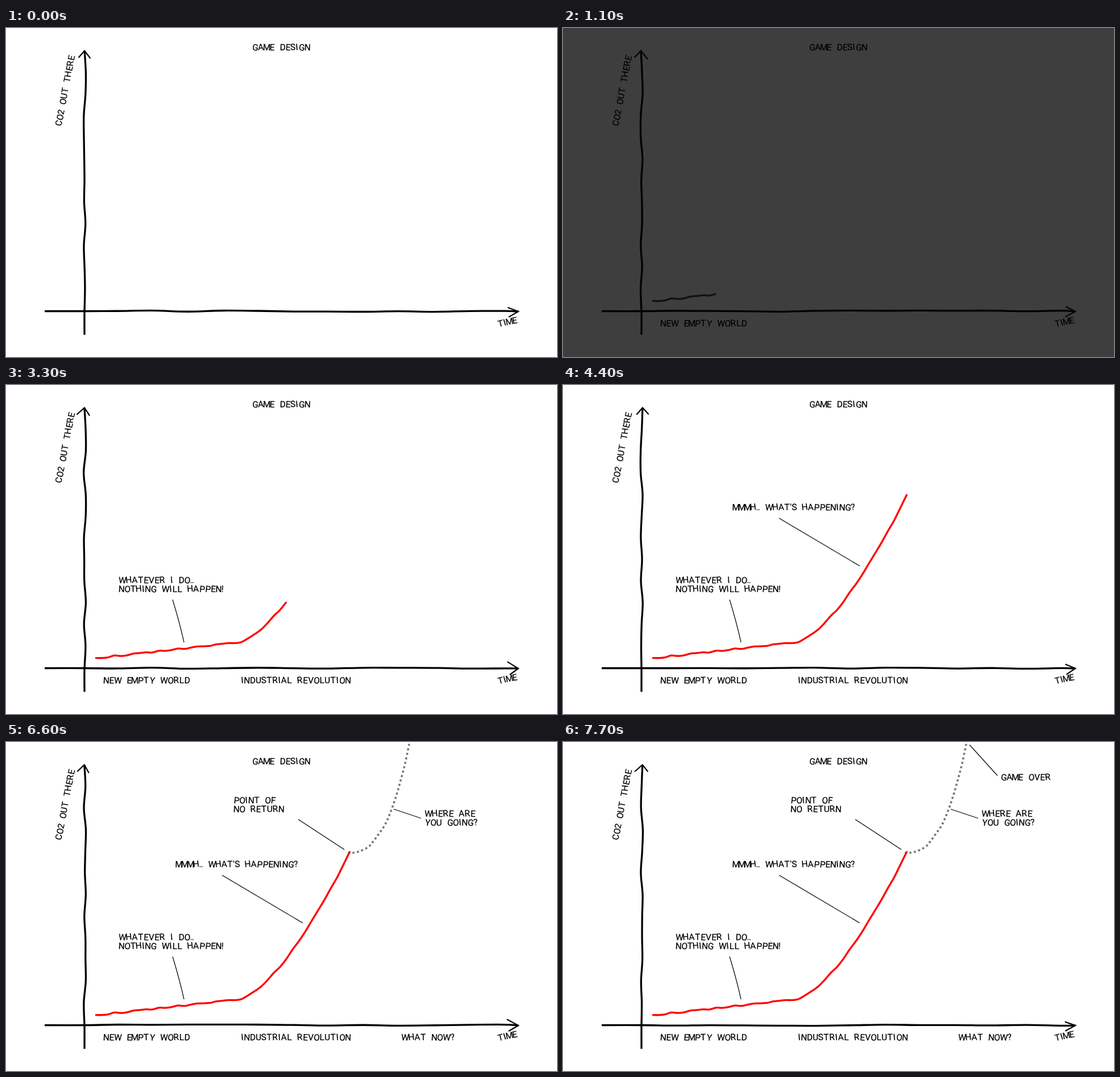
These frames come from a looping animation (969x578 px, 8000 ms). An HTML page:

```html
<!DOCTYPE html>
<html lang="en">
<head>
<meta charset="utf-8">
<title>Game design</title>
<style>
  html, body { margin: 0; width: 100%; height: 100%; overflow: hidden; background: #fff; }
  svg { display: block; width: 100%; height: 100%; }
  path { fill: none; stroke: #000; }
  text { font: 15.5px Roboto, "Open Sans", sans-serif; text-anchor: middle; stroke: #000; stroke-width: .2; stroke-linejoin: round; }
  .axis { stroke-width: 3.3; }
  .arrow { stroke-width: 2.2; }
  .pointer { stroke-width: 1.2; }
  .curve { stroke: #f00; stroke-width: 3.3; }
  .future { stroke: #777; stroke-width: 3.6; stroke-dasharray: 3.6 4.4; }
  .dark { background: #3e3e3e; }
  .dark .curve { stroke: #111; }
</style>
</head>
<body>
<svg id="stage" viewBox="0 0 969 578"></svg>
<script>
const LOOP = 8000, STEP = 1100, LINE_HEIGHT = 15.5;
const stage = document.getElementById('stage');

// from: first step in which the label shows; pointer: its thin line
const labels = [
  { from: 0, x: 433, y: 39, lines: ['GAME DESIGN'] },
  { from: 0, x: 97, y: 173, angle: -79, lines: ['CO2 OUT THERE'] },
  { from: 0, x: 866, y: 525.5, angle: -13, lines: ['TIME'] },
  { from: 1, x: 171, y: 524, lines: ['NEW EMPTY WORLD'] },
  { from: 2, x: 198, y: 348, lines: ['WHATEVER I DO..', 'NOTHING WILL HAPPEN!'], pointer: 'M293 377Q306 420 313 452' },
  { from: 3, x: 413, y: 524, lines: ['INDUSTRIAL REVOLUTION'] },
  { from: 4, x: 299, y: 220, lines: ["MMMH.. WHAT'S HAPPENING?"], pointer: 'M380 234L522 318' },
  { from: 5, x: 695, y: 524, lines: ['WHAT NOW?'] },
  { from: 5, x: 400, y: 107.5, lines: ['POINT OF', 'NO RETURN'], pointer: 'M514 136L595 189' },
  { from: 6, x: 736, y: 131, lines: ['WHERE ARE', 'YOU GOING?'], pointer: 'M682 118L730 134' },
  { from: 7, x: 770, y: 67, lines: ['GAME OVER'], pointer: 'M715 5L764 59' }
];

// Seeded noise between -1 and 1
function noise(seed) {
  seed = seed * 7919 + 4321;
  const next = () => {
    seed = seed * 16807 % 2147483647;
    return seed / 2147483647 * 2 - 1;
  };
  next();
  return next;
}

// Smooth line through the points
function spline(points) {
  const at = i => points[Math.max(0, Math.min(points.length - 1, i))];
  let d = `M${points[0]}`;
  for (let i = 0; i < points.length - 1; i++) {
    const [a, b, c, e] = [at(i - 1), at(i), at(i + 1), at(i + 2)];
    const before = b.map((v, k) => v + (c[k] - a[k]) / 6);
    const after = c.map((v, k) => v - (e[k] - b[k]) / 6);
    d += `C${before} ${after} ${c}`;
  }
  return d;
}

const stroke = (name, d) => `<path class="${name}" d="${d}"/>`;

// Hand lettering: a few letter widths, each letter with its own tilt
function advance(ch) {
  if (ch === 'W') return 13.3;
  if (ch === ' ') return 9;
  if (/[.'!]/.test(ch)) return 3.3;
  if (ch === 'I') return 5.5;
  return /[EFLS2?]/.test(ch) ? 8.8 : 10.2;
}

function letters(line, row) {
  let pen = 0;
  const xs = [], tilts = [];
  for (const ch of line) {
    xs.push(pen + advance(ch) / 2);
    tilts.push((ch.charCodeAt(0) * 37 % 9 - 4) * 1.5);
    pen += advance(ch);
  }
  return `<text x="${xs.join(' ')}" y="${row * LINE_HEIGHT}" rotate="${tilts.join(' ')}">${line}</text>`;
}

const label = ({ x, y, angle = 0, lines, pointer }) =>
  `<g transform="translate(${x} ${y}) rotate(${angle})">${lines.map(letters).join('')}</g>` +
  (pointer ? stroke('pointer', pointer) : '');

// Both axes are sketched anew in every step
function axes(step) {
  const random = noise(step);
  const near = (value, spread) => value + random() * spread;
  const tip = near(138.5, 1.5);
  const vertical = [[tip, 40]];
  for (let y = 78; y < 480; y += 38) vertical.push([near(138.5, 2), y]);
  vertical.push([138, 500], [138, 539]);
  const horizontal = [[68, 497.5], [140, 497.5]];
  for (let x = 195; x < 880; x += 62) horizontal.push([x, near(497.5, 1.1)]);
  horizontal.push([901, 498]);
  return stroke('axis', spline(vertical)) + stroke('axis', spline(horizontal)) +
    stroke('arrow', `M${near(tip - 12, 2)} 52L${tip} 40L${near(tip + 11, 3)} ${near(53, 2)}`) +
    stroke('arrow', `M${near(882, 3)} ${near(489, 3)}L901 498L${near(884, 2)} ${near(508, 1)}`);
}

// Slow straight rise, then a steep one
function level(x) {
  const slow = 480 - 28 * Math.min(1, (x - 157) / 253);
  const steep = Math.max(0, (x - 410) / 195);
  return slow - 259 * steep ** 1.5;
}

function curve(progress) {
  const random = noise(3);
  const points = [];
  for (let i = 0; i <= 40 * progress; i++) {
    const x = 157 + i * 11.2;
    points.push([x, level(x) + random() * 1.2]);
  }
  return stroke('curve', spline(points));
}

function future(progress) {
  const random = noise(5);
  const points = [];
  for (let i = 0; i <= 12 * progress; i++) {
    const s = i / 12;
    points.push([601 + 110 * s + random(), 195 - 199 * s ** 2.6]);
  }
  return stroke('future', spline(points));
}

function draw(step) {
  stage.classList.toggle('dark', step === 1);
  stage.innerHTML = axes(step) +
    (step > 4 ? future(Math.min(1, (step - 4) / 2)) : '') +
    (step > 0 ? curve(Math.min(1, step / 4)) : '') +
    labels.filter(item => item.from <= step).map(label).join('');
}

const start = performance.now();
let current = -1;
function tick() {
  const step = Math.floor((performance.now() - start) % LOOP / STEP);
  if (step !== current) draw(current = step);
  requestAnimationFrame(tick);
}
tick();
</script>
</body>
</html>
```
